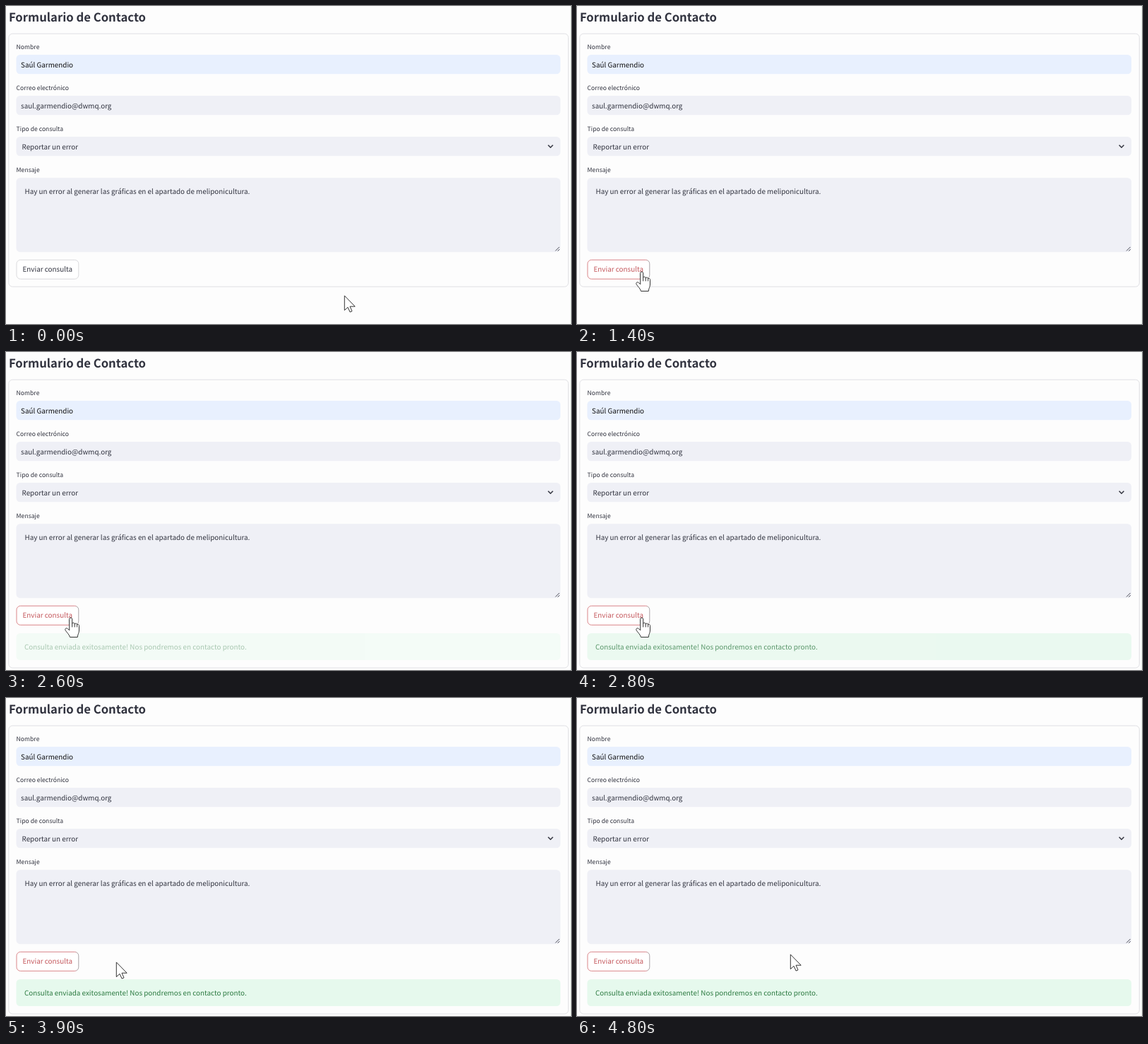
An HTML page that plays this animation: 800 px wide and 450 px high, repeating every 4900 ms.

```html
<!DOCTYPE html>
<html lang="es">
<head>
<meta charset="utf-8">
<title>Formulario de Contacto</title>
<style>
  html, body { margin: 0; width: 100%; height: 100%; overflow: hidden; background: #fdfdfd; }
  svg { display: block; width: 800px; height: 450px; }
  text {
    font: 9.87px "Noto Sans CJK SC", "Noto Sans CJK JP", "Noto Sans", sans-serif;
    fill: #31333f;
    text-rendering: geometricPrecision;
  }
  .title { font-size: 16.7px; font-weight: 700; }
  .label { font-size: 8.63px; }
  .field { fill: #eff0f6; }
  .filled { fill: #e8f0fe; }
  .filled-text { fill: #111; }
  .frame { fill: none; stroke: #d9d9dd; stroke-width: .8; }
  .button { fill: #fff; stroke: #d6d6da; stroke-width: .9; }
  .hover .button { stroke: url(#edge); }
  .hover text { fill: #c4565b; }
  .alert rect { fill: #e6f9ed; }
  .alert text { fill: #2c7a41; }
  .icon { fill: none; stroke: #31333f; }
  .cursor { fill: #fff; stroke: #2a2a2a; stroke-width: .95; stroke-linejoin: round; stroke-linecap: round; }
</style>
</head>
<body>
<svg viewBox="0 0 800 450">
  <defs>
    <linearGradient id="edge" gradientUnits="userSpaceOnUse" x1="15" y1="0" x2="103" y2="0">
      <stop offset=".94" stop-color="#d6777c"/>
      <stop offset=".98" stop-color="#a0999d"/>
    </linearGradient>
  </defs>
  <rect x="799" width="1" height="450" fill="#eef6ee"/>

  <text class="title" x="3.9" y="22">Formulario de Contacto</text>
  <rect id="frame" class="frame" x="3.8" y="39.2" width="792.5" height="358" rx="5.5"/>

  <text class="label" x="14.6" y="61.4">Nombre</text>
  <rect class="field filled" x="14.5" y="69" width="770.5" height="27.3" rx="5.5"/>
  <text class="filled-text" x="21.1" y="86.7">Saúl Garmendio</text>

  <text class="label" x="14.6" y="119.2">Correo electrónico</text>
  <rect class="field" x="14.5" y="127" width="770.5" height="27.3" rx="5.5"/>
  <text x="21.1" y="144.7">saul.garmendio@dwmq.org</text>

  <text class="label" x="14.6" y="177.3">Tipo de consulta</text>
  <rect class="field" x="14.5" y="185" width="770.5" height="27.3" rx="5.5"/>
  <text x="22.5" y="202.5">Reportar un error</text>
  <path class="icon" d="M767.6 196.8l3.4 3.4 3.4-3.4" stroke-width="1.5"/>

  <text class="label" x="14.6" y="235.1">Mensaje</text>
  <rect class="field" x="14.5" y="243.2" width="770.5" height="105" rx="5.5"/>
  <text x="26.5" y="266.4">Hay un error al generar las gráficas en el apartado de meliponicultura.</text>
  <path class="icon" d="M778 346.5l5.5-5.5M781.3 346.7l2.4-2.4" stroke-width=".9"/>

  <g id="send">
    <rect class="button" x="15" y="359.3" width="87.8" height="27" rx="5.5"/>
    <text x="23.5" y="376.1">Enviar consulta</text>
  </g>

  <g id="alert" class="alert">
    <rect x="14.5" y="398" width="770.5" height="38" rx="5.5"/>
    <text x="25.9" y="420.7">Consulta enviada exitosamente! Nos pondremos en contacto pronto.</text>
  </g>

  <g id="cursor" class="cursor">
    <path id="arrow" d="M.3 .3V20.6L5 16.3 8.1 23.1 11 21.8 8 15.2H14.8Z"/>
    <g id="hand">
      <path d="M-2.5 2C-2.5-.6 1.7-.6 1.7 2V8.2C2.5 6.6 5 7 5.3 8.8 6.3 7.4 8.4 8 8.6 9.8 9.8 8.8 11.5 9.6 11.5 11.4V18C11.5 22 9.5 23 9.3 27.5H-1.5C-2 24-6.5 20.5-8 17.5-9 15.3-6.3 14-4.6 15.6L-2.5 17.6Z"/>
      <path d="M1.7 8.2V13M5.3 8.8V13M8.6 9.8V13"/>
    </g>
  </g>
</svg>
<script>
  const LOOP = 4900, TICK = 100;
  const HOVER_AT = 800, SENT_AT = 2600, LEAVE_AT = 3800;

  // [time, x, y] of the pointer tip
  const pointer = [
    [0, 479, 410], [100, 455, 409], [200, 395, 404], [300, 320, 397],
    [400, 245, 389], [500, 180, 382], [600, 139, 378], [700, 112, 376],
    [900, 92, 376], [3600, 92, 376], [3700, 108, 375], [3900, 156, 374],
    [4200, 225, 369], [4500, 273, 365], [4800, 302, 363]
  ];
  // [time, opacity] of the confirmation
  const fade = [[SENT_AT, 0.4], [2800, 0.78], [3000, 1]];

  const byId = id => document.getElementById(id);
  const [frame, send, alertBox, cursor, arrow, hand] =
    ["frame", "send", "alert", "cursor", "arrow", "hand"].map(byId);

  function sample(keys, t) {
    const next = keys.findIndex(k => k[0] > t);
    if (next < 0) return keys[keys.length - 1].slice(1);
    if (next === 0) return keys[0].slice(1);
    const a = keys[next - 1], b = keys[next];
    const p = (t - a[0]) / (b[0] - a[0]);
    return a.slice(1).map((v, i) => v + (b[i + 1] - v) * p);
  }

  const show = (el, on) => el.setAttribute("visibility", on ? "visible" : "hidden");

  function draw(t) {
    const sent = t >= SENT_AT;
    const over = t >= HOVER_AT && t < LEAVE_AT;
    const [x, y] = sample(pointer, t);
    cursor.setAttribute("transform", `translate(${x} ${y})`);
    show(hand, over);
    show(arrow, !over);
    send.classList.toggle("hover", t >= HOVER_AT);
    frame.setAttribute("height", sent ? 407.8 : 358);
    alertBox.setAttribute("opacity", sent ? sample(fade, t)[0] : 0);
  }

  const start = performance.now();
  function tick() {
    const t = (performance.now() - start) % LOOP;
    draw(Math.floor(t / TICK) * TICK);
    requestAnimationFrame(tick);
  }
  tick();
</script>
</body>
</html>
```
